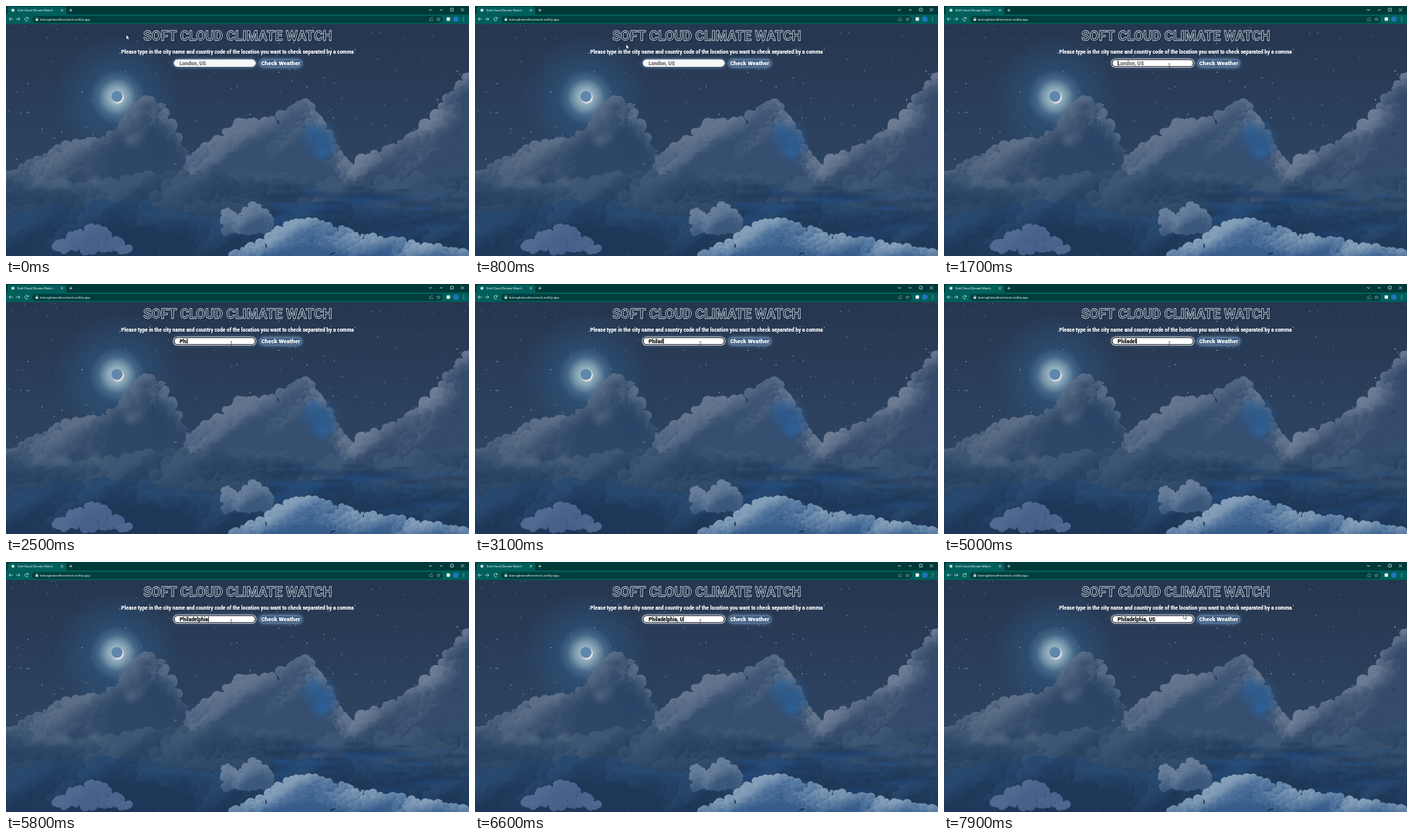
Write an HTML page with a canvas that moves like this. It is 600 px wide and 325 px high and loops after 8 s.

```html
<!DOCTYPE html>
<html lang="en">
<head>
<meta charset="utf-8">
<title>Soft Cloud Climate Watch</title>
<style>
html, body { margin: 0; width: 100%; height: 100%; overflow: hidden; background: #263a56; }
canvas { display: block; width: 600px; height: 325px; }
</style>
</head>
<body>
<canvas id="stage" width="600" height="325"></canvas>
<script>
const W = 600, H = 325, LOOP = 8000;
const stage = document.getElementById('stage').getContext('2d');
const backdrop = document.createElement('canvas');
backdrop.width = W;
backdrop.height = H;
let ctx = backdrop.getContext('2d');

let seed = 29;
const rand = (lo = 0, hi = 1) => {
  seed = (seed * 16807) % 2147483647;
  return lo + (hi - lo) * seed / 2147483647;
};
const rgb = hex => [1, 3, 5].map(i => parseInt(hex.slice(i, i + 2), 16));
const mix = (a, b, k) => {
  const to = rgb(b), part = Math.max(0, Math.min(1, k));
  return `rgb(${rgb(a).map((v, i) => Math.round(v + (to[i] - v) * part))})`;
};
const hill = (x, center, width) => Math.exp(-(((x - center) / width) ** 2));
const swirl = (x, y) => Math.sin(x / 23 + 2 * Math.sin(y / 17 + x / 41));

function box(x, y, w, h, r, fill) {
  ctx.beginPath();
  ctx.roundRect(x, y, w, h, r);
  ctx.fillStyle = fill;
  ctx.fill();
}

function disc(x, y, r, fill) {
  ctx.beginPath();
  ctx.arc(x, y, r, 0, 7);
  ctx.fillStyle = fill;
  ctx.fill();
}

function lines(d, color, width = 0.7) {
  ctx.strokeStyle = color;
  ctx.lineWidth = width;
  ctx.stroke(new Path2D(d));
}

function label(text, x, y, size, color, weight = 900) {
  ctx.font = `${weight} ${size}px Roboto, sans-serif`;
  ctx.fillStyle = color;
  ctx.fillText(text, x, y);
}

function glow(x, y, r, color, alpha) {
  const g = ctx.createRadialGradient(x, y, 0, x, y, r), c = rgb(color);
  g.addColorStop(0, `rgba(${c},${alpha})`);
  g.addColorStop(0.5, `rgba(${c},${alpha * 0.5})`);
  g.addColorStop(1, `rgba(${c},0)`);
  disc(x, y, r, g);
}

// Round billow, brighter along its upper left edge
function billow(x, y, r, edge, core) {
  const g = ctx.createRadialGradient(x + r * 0.4, y + r * 0.5, r * 0.2, x + r * 0.4, y + r * 0.5, r * 1.5);
  g.addColorStop(0, core);
  g.addColorStop(1, edge);
  disc(x, y, r, g);
}

// Rows of billows under a ridge, fading from lit to shade with depth
function bank(left, right, ridge, floor, size, lit, shade, fade = 40) {
  const step = size * 0.7;
  for (let depth = 0; depth < H; depth += step)
    for (let x = left; x <= right; x += step) {
      const px = x + rand(-step, step), py = ridge(px) + depth + rand(0.1, 0.9) * size;
      if (py > floor) continue;
      const dim = depth / fade + 0.35 * swirl(px, py);
      billow(px, py, size * rand(0.35, 1.15), mix(lit, shade, dim), mix(lit, shade, dim + 0.4));
    }
}

// Soft patch of colour
function tint(x, y, rx, ry, color, alpha) {
  for (let i = 0; i < 24; i++) {
    const a = rand(0, 6.28), d = Math.sqrt(rand());
    glow(x + rx * d * Math.cos(a), y + ry * d * Math.sin(a), rand(7, 17), color, alpha);
  }
}

function drawSky() {
  const sky = ctx.createLinearGradient(0, 23, 0, 220);
  sky.addColorStop(0, '#26364f');
  sky.addColorStop(1, '#2d4563');
  ctx.fillStyle = sky;
  ctx.fillRect(0, 0, W, H);
  for (let i = 0; i < 280; i++)
    disc(rand(0, W), rand(25, 200), rand(0.3, 0.85), `rgba(195,210,225,${rand(0.15, 0.85)})`);

  glow(144, 118.5, 82, '#2f6495', 0.65);
  glow(144, 118.5, 36, '#8aabbd', 0.8);
  glow(144, 118.5, 24, '#b9cfd3', 0.9);
  disc(145, 119, 7.7, '#e6dfe2');
  disc(143.8, 117.6, 7.2, '#5f87ad');
}

function drawClouds() {
  ctx.filter = 'blur(0.4px)';
  bank(425, 610, x => 215 - (x - 420) * 0.42 - 52 * hill(x, 605, 50), 250, 8, '#6d7d95', '#344b6b');
  bank(218, 442, x => 215 - 65 * hill(x, 315, 68) - 70 * hill(x, 392, 38), 250, 7, '#64768f', '#364f70');
  tint(410, 172, 18, 24, '#2e659f', 0.3);
  bank(-10, 230, x => 222 - 97 * hill(x, 187, 46) - 45 * hill(x, 95, 65), 260, 7, '#5c6f88', '#2e4767');
  tint(165, 152, 17, 24, '#677b93', 0.16);
  tint(205, 185, 22, 38, '#28466a', 0.25);

  bank(-10, 610, x => 223 + 8 * Math.sin(x / 55), H + 5, 10, '#3d5775', '#243e5e', 60);
  tint(75, 229, 50, 7, '#5c718b', 0.18);
  bank(-10, 610, x => 268 + 11 * Math.sin(x / 48 + 2), H + 5, 10, '#294a70', '#1e3758', 45);
  for (let i = 0; i < 40; i++) {
    ctx.save();
    ctx.translate(rand(340, W), rand(234, 298));
    ctx.scale(4, 0.6);
    glow(0, 0, rand(5, 13), i % 2 ? '#23518a' : '#172c4c', 0.4);
    ctx.restore();
  }
  bank(64, 160, x => 322 - 35 * hill(x, 110, 45), 318, 6, '#526991', '#435c87');
  bank(284, 340, x => 286 - 29 * hill(x, 322, 24) - 22 * hill(x, 286, 9), 294, 5, '#687f9c', '#3b587c', 30);
  bank(292, 610, x => 326 - 46 * hill(x, 385, 65) - 22 * hill(x, 500, 80), H + 5, 6, '#86a0ba', '#365d8c', 28);
  ctx.filter = 'none';
}

function drawBrowser() {
  ctx.fillStyle = '#003a38';
  ctx.fillRect(0, 0, W, 12);
  box(2, 1, 76, 13, 3, '#005f5b');
  ctx.fillStyle = '#005f5b';
  ctx.fillRect(0, 11, W, 12.5);
  box(34, 13, 532, 9, 4.5, '#003f3d');

  disc(9, 5.6, 2, '#c9dedd');
  label('Soft Cloud Climate Watch', 15, 6, 4, '#f2fafa', 400);
  label('latenightweathercheck.netlify.app', 44, 17.5, 4.35, '#f2fafa', 400);
  const ink = '#d5e7e5';
  lines('M71 4l3 3M74 4l-3 3M82 5.5h4M84 3.5v4', ink);
  lines('M548 4l2 2l2 -2M562 5h4M576 3h3.5v3.5h-3.5zM589.5 3l4 4M593.5 3l-4 4', ink);
  lines('M9 17H4M6 15l-2 2l2 2M13 17h5M16 15l2 2l-2 2', ink);
  lines('M28.6 16a2.2 2.2 0 1 0 0 2.3M28.8 14.6v1.8h-1.8', ink);
  lines('M39 17v-1a1 1 0 0 1 2 0v1', ink, 0.5);
  box(38.4, 16.7, 3.2, 2.5, 0.4, ink);
  lines('M549 16v3h4v-2M550 17q0 -2 3 -2', '#9fc0bd', 0.5);
  lines('M560.5 15l.7 1.5h1.6l-1.2 1l.5 1.7l-1.6 -1l-1.6 1l.5 -1.7l-1.2 -1h1.6z', '#9fc0bd', 0.5);
  box(571, 14.8, 4.4, 4.4, 0.6, '#f2f7f7');
  disc(583, 17, 3.5, '#1c77bd');
  [15, 17, 19].forEach(y => disc(593, y, 0.5, ink));
}

function drawPage() {
  ctx.textAlign = 'center';
  ctx.lineJoin = 'round';
  ctx.font = '700 17.5px Roboto, sans-serif';
  ctx.shadowColor = '#111d30';
  ctx.shadowOffsetX = ctx.shadowOffsetY = 1;
  ctx.strokeStyle = '#cbd5e1';
  ctx.lineWidth = 0.8;
  ctx.strokeText('SOFT CLOUD CLIMATE WATCH', 300.5, 39.5);
  ctx.shadowColor = 'transparent';
  label('Please type in the city name and country code of the location you want to check separated by a comma',
    300, 60, 6.5, '#ffffff');

  ctx.shadowOffsetX = ctx.shadowOffsetY = 0;
  ctx.shadowColor = '#7fa5cf';
  ctx.shadowBlur = 4;
  box(217.5, 69.5, 106, 9.5, 4.7, '#f6f7f7');
  box(328.5, 69.5, 55, 10, 5, '#6485a8');
  ctx.shadowColor = 'transparent';
  box(329.3, 70.3, 53.4, 8.4, 4.2, '#425f83');
  label('Check Weather', 356, 74.7, 7.4, '#ffffff');
  ctx.textAlign = 'left';
}

const FOCUS = 1500, KEY_GAP = 140;
const BURSTS = [['Philad', 2200], ['el', 4600], ['phia', 5300], [', U', 6200], ['S', 7100]];
const keys = BURSTS.flatMap(([text, start]) =>
  [...text].map((char, i) => ({ char, time: start + i * KEY_GAP })));

function drawInput(t) {
  const focused = t >= FOCUS;
  const pressed = keys.filter(key => key.time <= t);
  const typed = pressed.map(key => key.char).join('');
  if (focused) {
    box(216.5, 68.5, 108, 11.5, 5.7, '#f4f5f7');
    box(217.3, 69.2, 106.4, 10.1, 5, '#14171d');
    box(218.5, 70.3, 104, 7.9, 4, '#ffffff');
  }
  label(typed || 'London, US', 225, 74.6, 6.6, typed ? '#08090b' : '#65686d');
  const lastInput = typed ? pressed.at(-1).time : FOCUS;
  if (focused && (t - lastInput) % 1000 < 500) {
    ctx.fillStyle = '#111111';
    ctx.fillRect(225 + ctx.measureText(typed).width, 70.8, 0.8, 6.8);
  }
}

function ease(t, start, end) {
  const k = Math.max(0, Math.min(1, (t - start) / (end - start)));
  return k * k * (3 - 2 * k);
}

function drawPointer(t) {
  const drift = ease(t, 100, 400), approach = ease(t, 600, 1400), leave = ease(t, 7700, 7900);
  ctx.save();
  ctx.translate(156 + 22 * drift + 114 * approach + 19 * leave, 38 + 7 * drift + 33 * approach - 9 * leave);
  if (t >= 1300 && t < 7800) {
    lines('M-1.2 -3h2.4M0 -3v6M-1.2 3h2.4', '#343a43', 0.6);
  } else {
    const arrow = 'M0 0v5l1.2 -1l.9 1.8l.8 -.4l-.8 -1.8h1.5z';
    lines(arrow, '#18202b', 0.9);
    ctx.fillStyle = '#ffffff';
    ctx.fill(new Path2D(arrow));
  }
  ctx.restore();
}

function frame(now) {
  const t = Math.max(0, now) % LOOP;
  ctx.drawImage(backdrop, 0, 0);
  drawInput(t);
  drawPointer(t);
  requestAnimationFrame(frame);
}

ctx.textBaseline = 'middle';
drawSky();
drawClouds();
drawBrowser();
drawPage();
ctx = stage;
ctx.textBaseline = 'middle';
requestAnimationFrame(frame);
</script>
</body>
</html>
```
